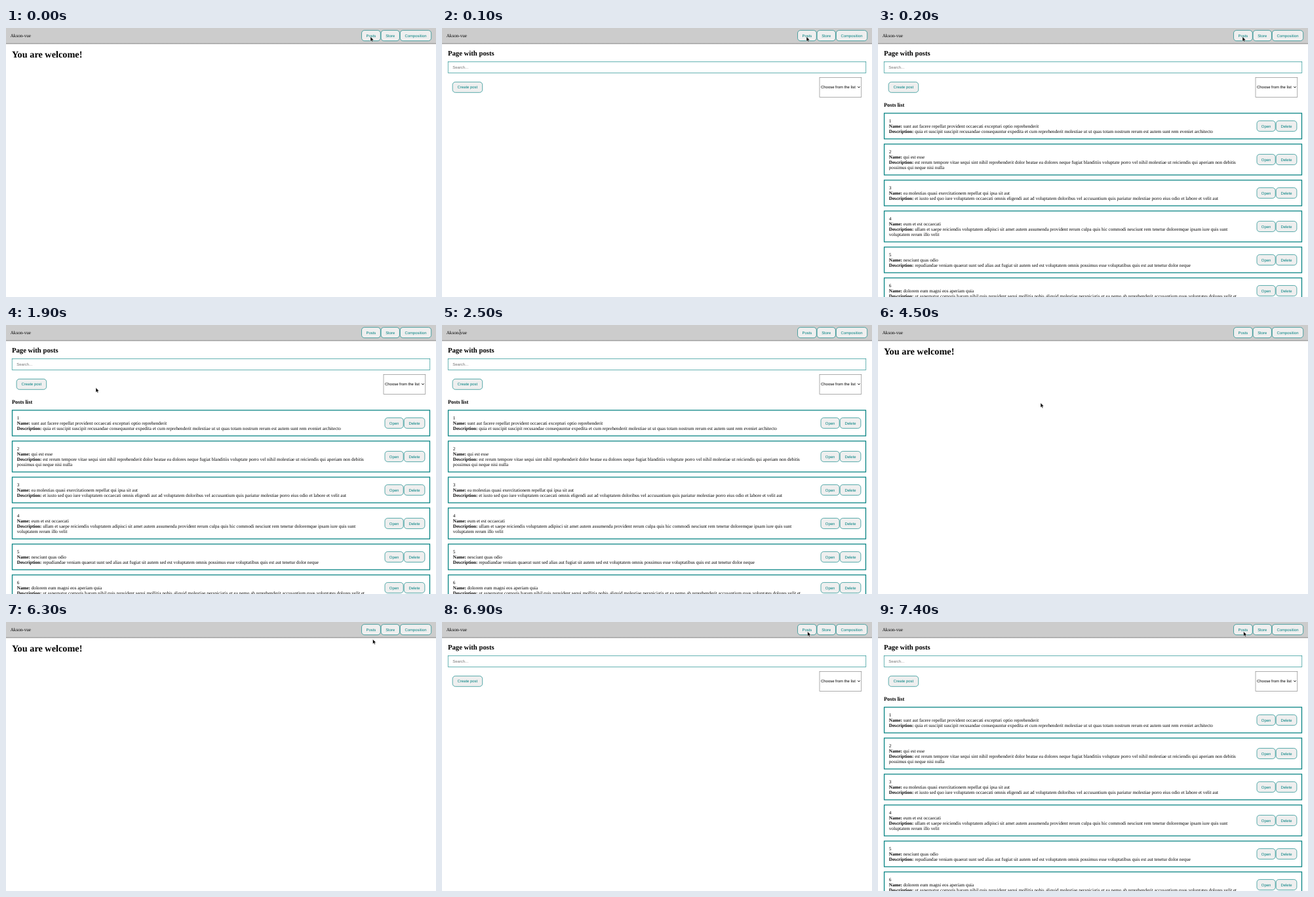
Recreate the animation shown at these times as an HTML page. Size 656 px wide and 410 px high, loop 8 s.

```html
<!DOCTYPE html>
<html lang="en">
<head>
<meta charset="utf-8">
<title>Posts app</title>
<style>
  html, body { margin: 0; width: 100%; height: 100%; overflow: hidden; background: #fff; }
  svg { display: block; width: 100vw; height: 100vh; }
  text { font: 7.14px "Liberation Serif", Times, serif; text-rendering: geometricPrecision; }
  .h1 { font-size: 14.28px; font-weight: bold; }
  .h2 { font-size: 10.71px; font-weight: bold; }
  .h3 { font-size: 8.35px; font-weight: bold; }
  .b { font-weight: bold; }
  .ui { font: 5.95px "Liberation Sans", Arial, sans-serif; }
  .label { fill: teal; text-anchor: middle; }
  .hint { fill: #757575; }
  .btn { fill: #efefef; stroke: teal; stroke-width: .65; }
  .card { fill: #fff; stroke: teal; stroke-width: 1.25; }
  .field { fill: #fff; stroke: teal; stroke-width: .6; }
  .select { fill: #fff; stroke: #767676; stroke-width: .6; }
</style>
</head>
<body>
<svg id="stage" viewBox="0 0 656 410">
  <defs>
    <linearGradient id="shade" x1="0" y1="0" x2="0" y2="1">
      <stop offset="0" stop-color="#808080"/>
      <stop offset=".35" stop-color="#a0a0a0"/>
      <stop offset="1" stop-color="#fff"/>
    </linearGradient>
  </defs>
  <rect width="656" height="410" fill="#fff"/>
  <g id="nav">
    <rect y="22.6" width="656" height="2.7" fill="url(#shade)"/>
    <rect width="656" height="22.8" fill="#ccc"/>
    <text x="6.7" y="13.8">Akson-vue</text>
  </g>
  <g id="home"><text class="h1" x="8.9" y="45.2">You are welcome!</text></g>
  <g id="page">
    <text class="h2" x="8.9" y="42">Page with posts</text>
    <rect class="field" x="9.2" y="51.6" width="637.6" height="16.7"/>
    <text class="ui hint" x="16.3" y="62">Search...</text>
    <rect class="select" x="576" y="75.4" width="63.8" height="30"/>
    <text class="ui" x="578" y="92.4">Choose from the list</text>
    <path d="M634.3 89.2l1.7 1.8 1.7-1.8" fill="none" stroke="#000" stroke-width=".9"/>
  </g>
  <g id="list"><text class="h3" x="8.9" y="120.4">Posts list</text></g>
  <path id="arrow" d="M0 0V7.1L1.6 5.6 2.7 8 3.9 7.5 2.9 5.1H5.1Z" fill="#000" stroke="#fff" stroke-width=".5"/>
  <path id="beam" d="M-1.2-3.6Q0-3.6 0-2.8Q0-3.6 1.2-3.6M0-2.8V2.8M-1.2 3.6Q0 3.6 0 2.8Q0 3.6 1.2 3.6" fill="none" stroke="#333" stroke-width=".6"/>
</svg>
<script>
const NS = "http://www.w3.org/2000/svg";
const $ = id => document.getElementById(id);
const LOOP = 8000, STEP = 100;

const posts = [
  ["sunt aut facere repellat provident occaecati excepturi optio reprehenderit",
   "quia et suscipit suscipit recusandae consequuntur expedita et cum reprehenderit molestiae ut ut quas totam nostrum rerum est autem sunt rem eveniet architecto"],
  ["qui est esse",
   "est rerum tempore vitae sequi sint nihil reprehenderit dolor beatae ea dolores neque fugiat blanditiis voluptate porro vel nihil molestiae ut reiciendis qui aperiam non debitis",
   "possimus qui neque nisi nulla"],
  ["ea molestias quasi exercitationem repellat qui ipsa sit aut",
   "et iusto sed quo iure voluptatem occaecati omnis eligendi aut ad voluptatem doloribus vel accusantium quis pariatur molestiae porro eius odio et labore et velit aut"],
  ["eum et est occaecati",
   "ullam et saepe reiciendis voluptatem adipisci sit amet autem assumenda provident rerum culpa quis hic commodi nesciunt rem tenetur doloremque ipsam iure quis sunt",
   "voluptatem rerum illo velit"],
  ["nesciunt quas odio",
   "repudiandae veniam quaerat sunt sed alias aut fugiat sit autem sed est voluptatem omnis possimus esse voluptatibus quis est aut tenetur dolor neque"],
  ["dolorem eum magni eos aperiam quia",
   "ut aspernatur corporis harum nihil quis provident sequi mollitia nobis aliquid molestiae perspiciatis et ea nemo ab reprehenderit accusantium quas voluptates dolores velit et"]
];

function add(parent, tag, attrs, content) {
  const el = document.createElementNS(NS, tag);
  for (const key in attrs) el.setAttribute(key, attrs[key]);
  if (content) el.textContent = content;
  return parent.appendChild(el);
}

function button(parent, x1, x2, cy, label) {
  add(parent, "rect", { class: "btn", x: x1 + .3, y: cy - 8, width: x2 - x1 - .6, height: 16, rx: 4.4 });
  add(parent, "text", { class: "ui label", x: (x1 + x2) / 2, y: cy + 2.1 }, label);
}

function line(parent, y, label, content) {
  const text = add(parent, "text", { x: 16.8, y });
  if (label) add(text, "tspan", { class: "b" }, label);
  add(text, "tspan", {}, (label ? " " : "") + content);
}

function build() {
  button($("nav"), 542.2, 571.6, 11.6, "Posts");
  button($("nav"), 571.8, 600.7, 11.6, "Store");
  button($("nav"), 601, 649, 11.6, "Composition");
  button($("page"), 15.8, 62, 90.3, "Create post");

  const list = $("list");
  let top = 129.3;
  posts.forEach(([name, desc, rest], i) => {
    const height = rest ? 48.3 : 40.3;
    add(list, "rect", { class: "card", x: 9.5, y: top + .6, width: 637, height: height - 1.2 });
    line(list, top + 14.4, "", String(i + 1));
    line(list, top + 22.4, "Name:", name);
    line(list, top + 30.5, "Description:", desc);
    if (rest) line(list, top + 38.5, "", rest);
    const cy = top + height / 2;
    button(list, 577.7, 606.5, cy, "Open");
    button(list, 606.9, 639.2, cy, "Delete");
    top += height + 6.7;
  });
}

// Pointer path: time, x, y
const path = [
  [0, 556, 13.3], [200, 556, 13.3], [400, 500, 58], [600, 316, 85], [700, 265, 89],
  [900, 265, 89], [1100, 226, 89], [1300, 249, 105], [1800, 249, 105],
  [1900, 137, 95.6], [2100, 64, 88], [2300, 30, 14], [2400, 27.3, 11],
  [3000, 27.3, 11], [3200, 30, 22], [3500, 36, 50], [4000, 92, 98], [4300, 133, 132],
  [4400, 133, 132], [4500, 248, 118.7], [4700, 385, 114], [4900, 476, 96],
  [5200, 555, 86], [5300, 556, 85], [5600, 554, 60], [5900, 555, 42],
  [6200, 559.5, 26.3], [6300, 559.5, 26.3], [6600, 557.7, 14.6], [LOOP, 557.7, 14.6]
];

function pointerAt(t) {
  const i = path.findIndex(p => p[0] > t);
  const [t0, x0, y0] = path[i - 1], [t1, x1, y1] = path[i];
  const k = (t - t0) / (t1 - t0);
  return [x0 + (x1 - x0) * k, y0 + (y1 - y0) * k];
}

const show = (id, on) => $(id).setAttribute("visibility", on ? "visible" : "hidden");
const within = (t, a, b) => t >= a && t < b;

function draw(now) {
  const t = Math.floor(now % LOOP / STEP) * STEP;
  const onPosts = within(t, 100, 2700) || t >= 6800;
  const overTitle = within(t, 2400, 3100);
  show("home", !onPosts);
  show("page", onPosts);
  show("list", within(t, 200, 2700) || t >= 7100);
  show("arrow", !overTitle);
  show("beam", overTitle);
  const [x, y] = pointerAt(t);
  for (const id of ["arrow", "beam"]) $(id).setAttribute("transform", `translate(${x} ${y})`);
}

build();
const start = performance.now();
function tick() {
  draw(performance.now() - start);
  requestAnimationFrame(tick);
}
tick();
</script>
</body>
</html>
```
